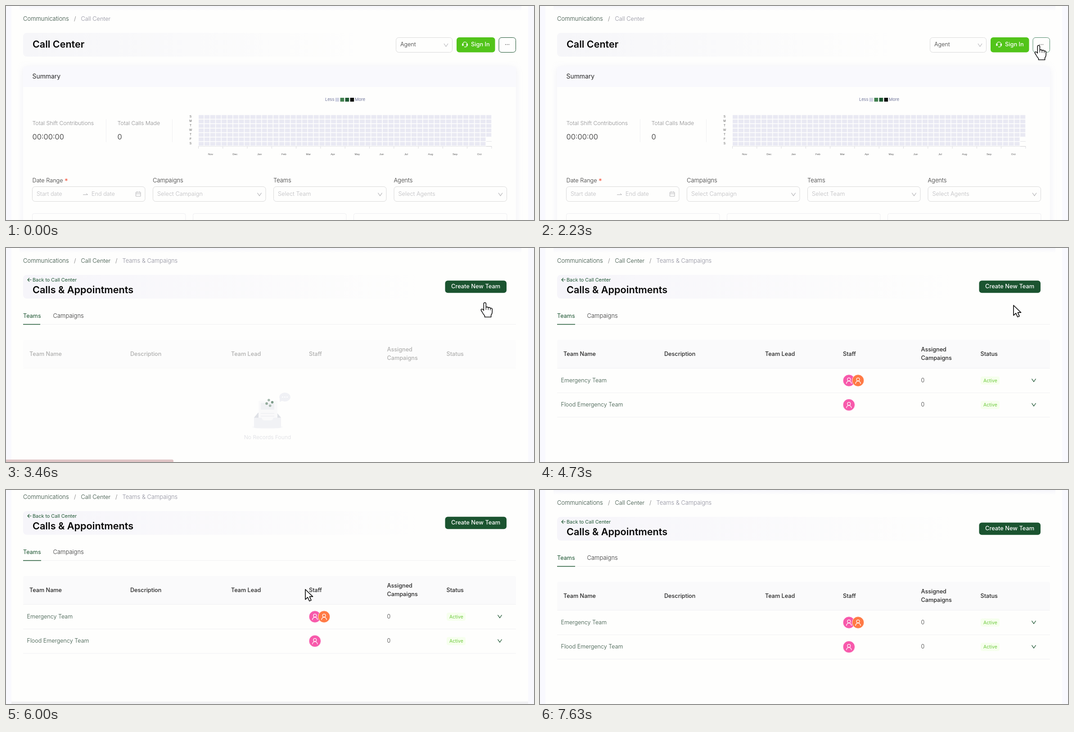
An HTML page for the animation above (8130 ms loop, 1173 px wide and 478 px high).

```html
<!DOCTYPE html>
<html lang="en">
<head>
<meta charset="utf-8">
<title>Call Center</title>
<style>
html, body { margin: 0; width: 100%; height: 100%; overflow: hidden; background: #f9f9fe; }
svg { display: block; width: 100%; height: 100%; font-family: Inter, "Open Sans", sans-serif; }
text { white-space: pre; }
</style>
</head>
<body>
<svg id="stage" viewBox="0 0 1173 478" preserveAspectRatio="none"></svg>
<script>
const LOOP = 8130;
const GREEN = '#1b5430', PAPER = '#fefefd', LINE = '#f0f0f2', EDGE = '#d9d9d9', HINT = '#bcbcbf';

const text = (x, y, s, size = 12.8, fill = '#333', weight = 300, more = '') =>
  `<text x="${x}" y="${y}" font-size="${size}" fill="${fill}" font-weight="${weight}" ${more}>${s}</text>`;
const rect = (x, y, w, h, fill, r = 0, more = '') =>
  `<rect x="${x}" y="${y}" width="${w}" height="${h}" fill="${fill}" rx="${r}" ${more}/>`;
const path = (d, stroke, width = 1, fill = 'none', more = '') =>
  `<path d="${d}" stroke="${stroke}" stroke-width="${width}" fill="${fill}" ${more}/>`;
const circle = (x, y, r, fill, more = '') => `<circle cx="${x}" cy="${y}" r="${r}" fill="${fill}" ${more}/>`;
const group = (id, body, more = '') => `<g id="${id}" ${more}>${body}</g>`;
const outline = (x, y, w, h, stroke = EDGE, r = 6, more = '') =>
  rect(x + .5, y + .5, w, h, PAPER, r, `stroke="${stroke}" ${more}`);
const chevron = (x, y, stroke, w = 4.5) => path(`M${x - w} ${y - 3}l${w} 6.5l${w} -6.5`, stroke, 1.2);
const repeat = (n, fn) => Array.from({ length: n }, (_, i) => fn(i)).join('');

const crumbs = last => {
  const live = '#2f4a3b', old = '#8e8e9c';
  return text(38, 33, 'Communications', 13, live) + text(151, 33, '/', 13, '#777') +
    text(166.5, 33, 'Call Center', 12.75, last ? live : old) +
    (last ? text(243, 33, '/', 13, '#777') + text(258.5, 33, last, 12.9, old) : '');
};

const backdrop = (height, fade) =>
  rect(12, -2, 1148, height, PAPER) + rect(30, 0, 1115, 11, 'url(#topFade)') +
  rect(38, 60, 890, 53, `url(#${fade})`, 8);

// Call center page
const COLS = 51, PITCH = 12.78;
const heatmap = () => {
  const days = [...'SMTWTFS'], months = 'Nov Dec Jan Feb Mar Apr May Jun Jul Aug Sep Oct'.split(' ');
  const tiny = 'text-anchor="middle" font-family="Liberation Sans, Arial, sans-serif"';
  return ['#d2d4e4', '#41804f', '#1f5a33', '#0b0f0c'].map((c, i) => rect(731.5 + i * 11, 205, 8.6, 8.6, c)).join('') +
    text(709, 212.3, 'Less', 9.2, '#6e7399', 400) + text(775, 212.3, 'More', 9.4, '#6e7399', 400) +
    repeat(COLS, c => repeat(c === COLS - 1 ? 5 : 7, r => rect(428 + c * PITCH, 243.6 + r * 10, 11.2, 8.3, '#e9e9f3'))) +
    days.map((d, i) => text(410, 249 + i * 10, d, 6.6, '#555', 400, tiny)).join('') +
    path('M427.5 313.5H1079M1067 302.5h12', '#e3e3e6', 1) +
    path(repeat(13, i => `M${427.5 + i * 54.28} 313v5.5`), '#dcdce0') +
    path('M1067 313.5h12', '#cfcfd2') +
    months.map((m, i) => text(454.6 + i * 54.28, 333, m, 6.2, '#555', 400, tiny)).join('') +
    rect(0, 0, 12.8, 10, PAPER, 0, 'id="hover"');
};

const headset = path('M1015 87.5v-2.5a4.6 4.6 0 0 1 9.2 0v2.5M1015 84.5h-1.2v4h2.2v-4M1024.2 84.5h1.2v4h-2.2v-4M1024 89q0 2.5 -3.6 2.5', '#fff', 1.1) +
  circle(1019.6, 91.4, 1.1, '#fff');

const callCenter = () => {
  const fields = [[326, 'Campaigns', 'Select Campaign'], [594, 'Teams', 'Select Team'], [861.5, 'Agents', 'Select Agents']];
  return backdrop(482, 'barA') + crumbs() +
    text(59, 92.5, 'Call Center', 21.5, '#050505', 600) +
    outline(866, 70, 125, 33) + text(876, 90.3, 'Agent', 12.6, '#333') + chevron(977.5, 87, '#b8b8bb') +
    rect(1001, 70, 85.5, 33.5, '#52c41a', 6) + headset + text(1033, 90.4, 'Sign In', 12.8, '#fff', 500) +
    outline(1094.5, 70, 37.5, 33, GREEN, 6, 'id="more"') + repeat(3, i => circle(1109.8 + i * 3.7, 86, .85, '#333')) +
    rect(38, 135, 1095, 360, PAPER, 8, 'filter="url(#soft)"') +
    path('M38 181V143q0 -8 8 -8H1125q8 0 8 8V181z', 'none', 0, '#f9f9fd') +
    text(58.5, 162, 'Summary', 13.9, '#262626', 400) +
    text(58.5, 266, 'Total Shift Contributions', 12.3, '#8d8d8f') + text(58.5, 297.5, '00:00:00', 16.5, '#222') +
    text(247.5, 266, 'Total Calls Made', 12.3, '#8d8d8f') + text(247.5, 297.5, '0', 16.5, '#222') +
    path('M222.5 253V304M369.5 253V304', LINE) + heatmap() +
    text(58.5, 393.5, 'Date Range', 12.7) + text(130, 396, '*', 15, '#f5604a', 500) +
    outline(58, 403, 250.5, 33) + text(68, 424, 'Start date', 12.7, HINT) + text(190, 424, 'End date', 12.7, HINT) +
    path('M171 421.5h10.5l-3.5 -3', '#b0b0b3') +
    path('M288.5 416h10.5v9h-10.5zM288.5 419.5h10.5M291.3 414v3M296.2 414v3', '#b5b5b8') +
    fields.map(([x, label, hint]) => text(x, 393.5, label, 12.9) + outline(x, 403, 250.5, 33) +
      text(x + 10, 423.7, hint, 12.8, HINT) + chevron(x + 237, 420.5, '#b0b0b3')).join('') +
    [58, 415, 772].map(x => outline(x, 463, 340.5, 40, '#ededf0', 4)).join('');
};

// Teams page
const avatar = (x, y, fill) => circle(x, y, 13.2, fill, 'stroke="#fff" stroke-width=".8"') +
  circle(x, y - 2.4, 3.4, 'none', 'stroke="#fff" stroke-width="1.3"') +
  path(`M${x - 5.6} ${y + 7.2}a5.6 6 0 0 1 11.2 0`, '#fff', 1.3);

const row = (y, name, staff) => text(46.5, y + 4, name, 12.55, '#2f4f3d') + staff.map((c, i) => avatar(686.3 + i * 20.3, y, c)).join('') +
  text(846.5, y + 4, '0', 12.5, '#333') + rect(979, y - 9, 42, 18, '#f6ffed', 4) +
  text(985, y + 4, 'Active', 10.4, '#6cc93c', 400) + chevron(1097, y - .8, GREEN) + path(`M38 ${y + 27.5}H1133`, LINE);

const empty = () => `<ellipse cx="581" cy="400" rx="34" ry="4" fill="#f8f8fa"/>` +
  path('M551 379l9 -11h42l9 11z', 'none', 0, '#dfe1e6') + rect(561, 341, 42, 45, '#f9f9fa', 3) +
  rect(566, 346, 30, 15, '#f0f1f4', 1) + path('M566 369.5h30M566 375.5h30', '#eeeff2', 1.6) +
  path('M551 379h17q1 6 6 6h14q5 0 6 -6h17v20q0 3 -3 3h-54q-3 0 -3 -3z', 'none', 0, '#f1f2f5') +
  `<ellipse cx="619.5" cy="333" rx="12.3" ry="10" fill="#f0f1f5"/>` + path('M608 336v8l6 -3z', 'none', 0, '#f0f1f5') +
  repeat(3, i => circle(614.5 + i * 5, 333, 1.4, '#fff')) +
  text(581, 426.5, 'No Records Found', 12.1, '#dadbe0', 300, 'text-anchor="middle"');

const dots = ['#a3b6aa', '#7b9a87', '#a9bbb0', '#93ab9c'];
const teams = () => {
  const head = [[52, 240.7, 'Team Name'], [276, 240.7, 'Description'], [500, 240.7, 'Team Lead'], [673, 240.7, 'Staff'],
    [846.5, 231, 'Assigned'], [846.5, 249.7, 'Campaigns'], [978.5, 240.7, 'Status']];
  return rect(12, 480, 1148, 60, '#f1f1f3') + backdrop(487.5, 'barB') + crumbs('Teams &amp; Campaigns') +
    path('M56.5 71h-8.2M52 67l-4 4l4 4', GREEN, 1.1) + text(59, 75, 'Back to Call Center', 10.85, GREEN, 400) +
    text(59, 101.3, 'Calls &amp; Appointments', 21.65, '#050505', 600) +
    rect(975.5, 72.7, 136.5, 27.5, GREEN, 6) + text(989, 90, 'Create New Team', 12.85, '#fff', 500) +
    path('M38 170.5H1133', LINE) + text(38, 156, 'Teams', 12.7, GREEN, 400) + text(104.5, 156, 'Campaigns', 13, '#333') +
    rect(38, 169.8, 40, 1.5, GREEN, 0, 'id="ink"') +
    group('table', rect(38, 205, 1095, 63.5, '#fafafb', 4) + path('M38 268.5H1133', LINE) +
      head.map(([x, y, s]) => text(x, y, s, 12.65, '#262626', 500)).join('') +
      group('rows', row(296, 'Emergency Team', ['#f759ab', '#ff7a45']) + row(350.4, 'Flood Emergency Team', ['#f759ab']))) +
    group('empty', empty()) +
    group('spinner', dots.map((c, i) => {
      const a = i * Math.PI / 2 - 1.8;
      return circle(6.4 * Math.cos(a), 6.4 * Math.sin(a), 2.8, c);
    }).join(''));
};

const arrow = path('M0 0V22.5L5.3 17.7L9 26L13 24.2L9.4 16.2H16.5Z', '#111', 1.7, '#fff', 'stroke-linejoin="round"');
const hand = path('M-2.7 2.5Q-2.6 0 -.2 0Q2.3 0 2.4 2.6V11Q3 9.5 5 9.6Q7 9.8 7.3 11.8Q8.2 10.4 9.8 10.6Q11.7 10.9 12 13Q13 12 14.4 12.4Q16.3 13 16.2 15.5V21Q16.2 25 13.6 28V32.2H-.5V29.2Q-4 25.5 -6.5 20.5L-8.6 17Q-9 14.5 -6.6 14.2Q-4.8 14.2 -2.7 17.4Z', '#111', 1.6, '#fff', 'stroke-linejoin="round"') +
  path('M2.4 10.5V16M7.3 12V16.5M12 13.2V17', '#111', 1.2);

const fade = (id, color, end) => `<linearGradient id="${id}"><stop stop-color="${color}"/><stop offset="${end}" stop-color="${color}" stop-opacity="0"/></linearGradient>`;
const stage = document.getElementById('stage');
stage.innerHTML = `<defs>${fade('barA', '#f6f6f9', .85)}${fade('barB', '#f6f5fa', 1)}
  <linearGradient id="topFade" x2="0" y2="1"><stop stop-color="#f6f6fb"/><stop offset="1" stop-color="#f6f6fb" stop-opacity="0"/></linearGradient>
  <filter id="soft" x="-5%" y="-10%" width="110%" height="120%"><feDropShadow dx="0" dy="2" stdDeviation="7" flood-color="#c9c9e6" flood-opacity=".3"/></filter></defs>` +
  rect(0, 0, 1173, 478, '#f9f9fe') + group('home', callCenter()) + group('teams', teams()) +
  rect(-6, 472.5, 378, 12, '#dfc3c4', 3, 'id="status"') + group('arrow', arrow) + group('hand', hand);

const el = Object.fromEntries([...stage.querySelectorAll('[id]')].map(n => [n.id, n]));
const show = (node, on) => node.setAttribute('display', on ? 'inline' : 'none');
const move = (node, x, y) => node.setAttribute('transform', `translate(${x} ${y})`);
const span = (t, a, b) => Math.min(1, Math.max(0, (t - a) / (b - a)));
const ease = p => p * p * (3 - 2 * p);

// Pointer stops: time, x, y
const stops = [
  [30, 1174, -27], [480, 808, 428], [660, 928, 247], [830, 1060, 44], [1230, 1090, 77],
  [1800, 1090, 77], [2150, 1108, 88], [2630, 1108, 88], [3150, 1064, 122], [4729, 1064, 122],
  [4730, 1052, 128], [4960, 665, 222], [6740, 665, 222], [6860, 125, 125], [7250, 125, 125], [7620, 292, -30]
];
const pointer = t => {
  const i = stops.findIndex(s => s[0] > t);
  if (i < 1) return [0, -100];
  const [a, x, y] = stops[i - 1], [b, u, v] = stops[i];
  const p = a < 830 ? span(t, a, b) : ease(span(t, a, b));
  return [x + (u - x) * p, y + (v - y) * p];
};

const SWITCH = 3270, LOADED = 4080;
function render(t) {
  const [x, y] = pointer(t), linked = t > 1800 && t < 4730 && (x > 1095 || t > 2630);
  show(el.arrow, !linked);
  show(el.hand, linked);
  move(linked ? el.hand : el.arrow, x, y);

  const second = t >= SWITCH;
  show(el.home, !second);
  show(el.teams, second);
  el.more.setAttribute('stroke', linked ? '#4b8766' : GREEN);

  // The heatmap cell under the pointer blanks a moment late
  const [hx, hy] = pointer(t - 12), col = Math.floor((hx - 428) / PITCH), line = Math.floor((hy - 243) / 10);
  show(el.hover, t < 830 && col >= 0 && col < COLS && line >= 0 && line < 7);
  move(el.hover, 427.3 + col * PITCH, 243 + line * 10);

  const loading = t < LOADED;
  show(el.rows, !loading);
  show(el.empty, loading);
  show(el.spinner, loading);
  el.table.setAttribute('opacity', loading ? .36 : .36 + .64 * span(t, LOADED, 4330));
  el.spinner.setAttribute('transform', `translate(585.3 346) rotate(${(t - 3460) * .3})`);
  el.ink.setAttribute('width', 40 * (1 - (1 - span(t, SWITCH, 3570)) ** 3));
  show(el.status, t > 2950 && t < 3640);
  el.status.setAttribute('opacity', span(t, 2950, 3050) * (1 - span(t, 3460, 3640)));

  const scroll = 32.5 * (ease(span(t, 5240, 5360)) - ease(span(t, 5830, 6130)));
  move(el.teams, 0, -Math.round(scroll));
}

const start = performance.now();
function tick() {
  render((performance.now() - start) % LOOP);
  requestAnimationFrame(tick);
}
tick();
</script>
</body>
</html>
```
